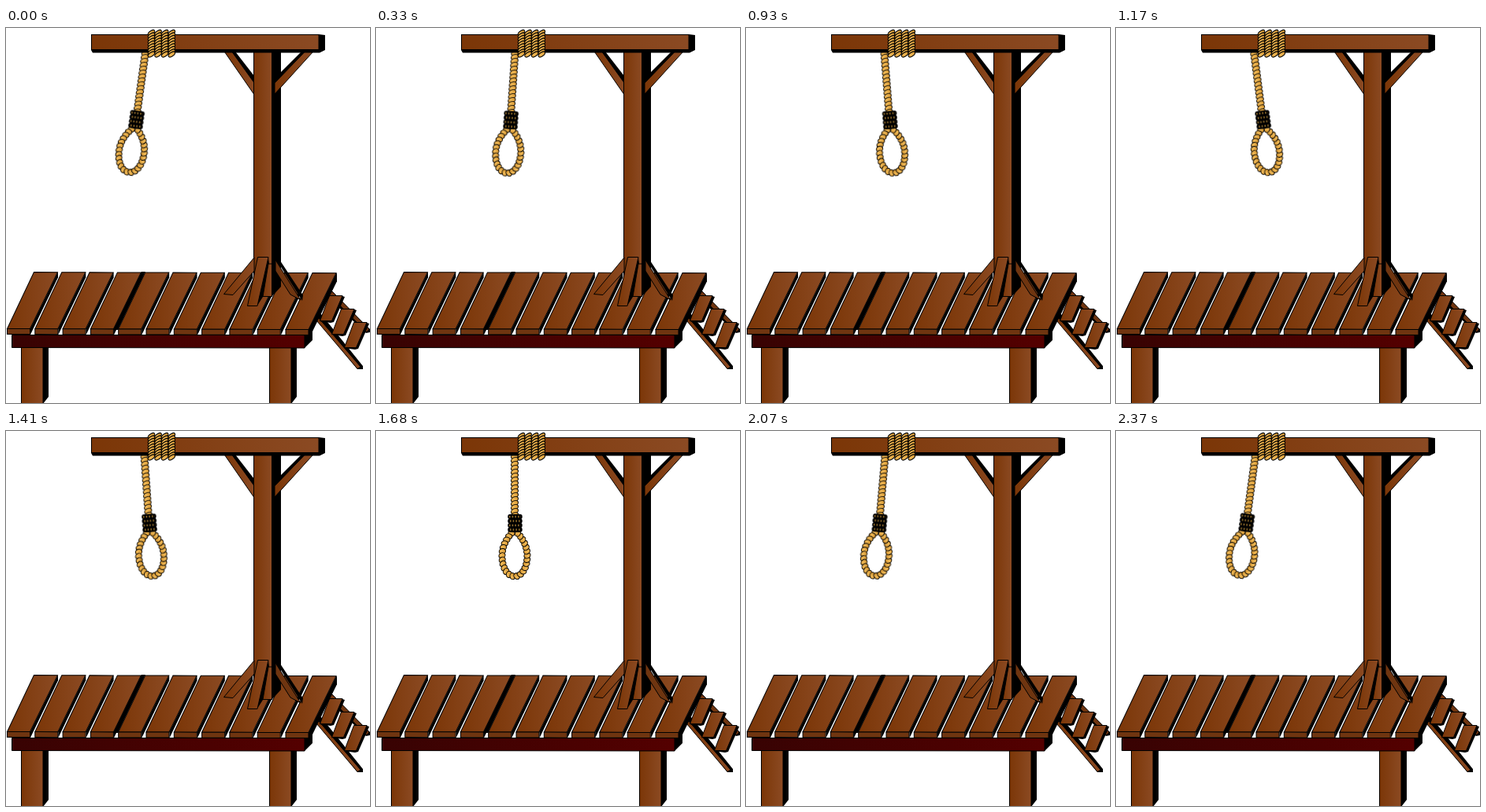
Write an HTML page without scripts that moves like this. It is 462 by 477 pixels and loops after 2.4 s.

```html
<!DOCTYPE html>
<html lang="en">
<head>
<meta charset="utf-8">
<title>Swinging rope</title>
<style>
  html, body { margin: 0; width: 100%; height: 100%; overflow: hidden; background: #fff; }
  svg { display: block; width: 462px; height: 477px; }
  .wood { fill: url(#wood); stroke: #000; }
  .front { fill: #6f3510; stroke: #000; }
  .rope { fill: none; marker: url(#strand); }
  .coil { fill: none; marker: url(#coil-strand); }
  .strand { fill: url(#gold); stroke: #000; }
  .wrap { stroke: #000; stroke-width: 6.5; stroke-linecap: round; }
  .fibre { stroke: #97722f; stroke-width: 2.6; stroke-dasharray: 1.5 2.2; }

  /* strands spaced evenly along the loop */
  .loop ellipse {
    rx: 3.4px; ry: 4.2px;
    offset-path: path("M172 130C166 137 160 146 160 159C160 174 167 185 176 185S192 174 192 159C192 146 186 137 180 130");
    offset-distance: calc(var(--i) * 4%);
    offset-rotate: auto -28deg;
  }

  .swing {
    transform-box: view-box;
    transform-origin: 176px 38px;
    animation: swing 2.4s infinite;
  }
  @keyframes swing {
    0%, 100% { transform: rotate(7.9deg); animation-timing-function: cubic-bezier(.35, .28, .65, .72); }
    49% { transform: rotate(-7.4deg); animation-timing-function: cubic-bezier(.3, .33, .6, .78); }
  }
</style>
</head>
<body>
<svg viewBox="0 0 462 477">
  <defs>
    <linearGradient id="wood">
      <stop stop-color="#7b3607"/>
      <stop offset="1" stop-color="#8b4a23"/>
    </linearGradient>
    <linearGradient id="girder">
      <stop stop-color="#380303"/>
      <stop offset="1" stop-color="#540000"/>
    </linearGradient>
    <linearGradient id="gold" x2="0" y2="1">
      <stop stop-color="#d3922c"/>
      <stop offset=".6" stop-color="#f0ba58"/>
      <stop offset="1" stop-color="#dc9e3a"/>
    </linearGradient>
    <marker id="strand" orient="auto" markerUnits="userSpaceOnUse" overflow="visible">
      <ellipse class="strand" rx="3.2" ry="4.8" transform="rotate(-28)"/>
    </marker>
    <marker id="coil-strand" orient="auto" markerUnits="userSpaceOnUse" overflow="visible">
      <ellipse class="strand" rx="2.4" ry="4.9" transform="rotate(-35)"/>
    </marker>
    <path id="turn" class="coil" d="M184.500 6v3.500v3.500v3.500v3.500v3.500v3.500v3.500v3"/>

    <g id="plank">
      <path d="M31 382L66 310V317L31 390Z"/>
      <path class="wood" d="M1.500 382.500L35.500 310.500H65.500L30.500 382.500Z"/>
      <path class="front" d="M1.500 382.500h29v7h-29z"/>
    </g>
    <g id="planks2"><use href="#plank"/><use href="#plank" x="35.300"/></g>
    <g id="planks4"><use href="#planks2"/><use href="#planks2" x="70.600"/></g>

    <g id="leg">
      <path d="M47 406h7v63l-7 9z"/>
      <path class="wood" d="M19.500 406.500h27.500v72h-27.500z"/>
    </g>
    <g id="step">
      <path d="M427 341l3 1-14 32-4 1-14-2z"/>
      <path class="wood" d="M410.500 340.500h16.500l-13.500 32h-15z"/>
    </g>
  </defs>

  <!-- ladder -->
  <path d="M409 333L462 383V387L457 388L406 340Z"/>
  <path class="front" d="M414 335L461 383L458 387L410 339Z"/>
  <path d="M392 364H400L453 430V434H446Z"/>
  <path class="wood" d="M391.500 369H397L450 431L446 433.500Z"/>
  <use href="#step"/>
  <use href="#step" x="15" y="17"/>
  <use href="#step" x="31" y="34"/>

  <!-- platform -->
  <use href="#leg"/>
  <use href="#leg" x="315"/>
  <path d="M378 391L389 380V397L379 407Z"/>
  <path d="M7.500 390.500H379V407L7.500 406.500Z" fill="url(#girder)" stroke="#000"/>
  <path d="M172 310h5L142 384h-6z"/>
  <g transform="skewY(.16)">
    <use href="#planks4"/>
    <use href="#planks4" x="141.200"/>
    <use href="#planks2" x="282.400"/>
    <path d="M384 383L420 310V321L389 385L384 390Z"/>
    <use href="#plank" x="353.500"/>
  </g>

  <!-- post and braces -->
  <path d="M337 28h12v301l-12 13z"/>
  <path d="M285 30h6L315 61V72Z"/>
  <path class="wood" d="M277.500 30.500H287L314.500 69V84Z"/>
  <path d="M375 30h6L341 74V64Z"/>
  <path class="wood" d="M379 30.500H389.500L341 84V70Z"/>
  <path class="wood" d="M314.500 27.500H337.500V341.500H314.500Z"/>
  <path class="wood" d="M315 292L276.500 338.500L288 339.500L315 309Z"/>
  <path d="M333 292L338 330L326 342L319 353Z"/>
  <path class="wood" d="M326 341.500L333 300H337.500V341.500Z"/>
  <path class="wood" d="M319.500 291.500H333L319 353.500H306.500Z"/>
  <path d="M342 293H346L377 340L376 347Z"/>
  <path class="front" d="M342 295L374 346L361 339L342 309Z"/>

  <!-- rope -->
  <g class="swing">
    <path class="rope" d="M176 27v5v5v5v5v5v5v5v5v5v5v5v5v5v5v5v5"/>
    <g class="loop">
      <ellipse class="strand" style="--i:0"/><ellipse class="strand" style="--i:1"/>
      <ellipse class="strand" style="--i:2"/><ellipse class="strand" style="--i:3"/>
      <ellipse class="strand" style="--i:4"/><ellipse class="strand" style="--i:5"/>
      <ellipse class="strand" style="--i:6"/><ellipse class="strand" style="--i:7"/>
      <ellipse class="strand" style="--i:8"/><ellipse class="strand" style="--i:9"/>
      <ellipse class="strand" style="--i:10"/><ellipse class="strand" style="--i:11"/>
      <ellipse class="strand" style="--i:12"/><ellipse class="strand" style="--i:13"/>
      <ellipse class="strand" style="--i:14"/><ellipse class="strand" style="--i:15"/>
      <ellipse class="strand" style="--i:16"/><ellipse class="strand" style="--i:17"/>
      <ellipse class="strand" style="--i:18"/><ellipse class="strand" style="--i:19"/>
      <ellipse class="strand" style="--i:20"/><ellipse class="strand" style="--i:21"/>
      <ellipse class="strand" style="--i:22"/><ellipse class="strand" style="--i:23"/>
      <ellipse class="strand" style="--i:24"/><ellipse class="strand" style="--i:25"/>
    </g>
    <path class="wrap" d="M170.500 109h12m-12 5.500h12m-12 5.500h12m-12 5.500h12"/>
    <path class="fibre" d="M169 109h15m-14 5.500h14m-15 5.500h15m-14 5.500h14"/>
  </g>

  <!-- beam and coil -->
  <path d="M108 8H397L405 9V28L398 31.500H110L108 28Z"/>
  <path class="wood" d="M108.500 8.500H397V27.500H108.500Z"/>
  <use href="#turn"/>
  <use href="#turn" x="8.600"/>
  <use href="#turn" x="17.200"/>
  <use href="#turn" x="25.800"/>
</svg>
</body>
</html>
```
